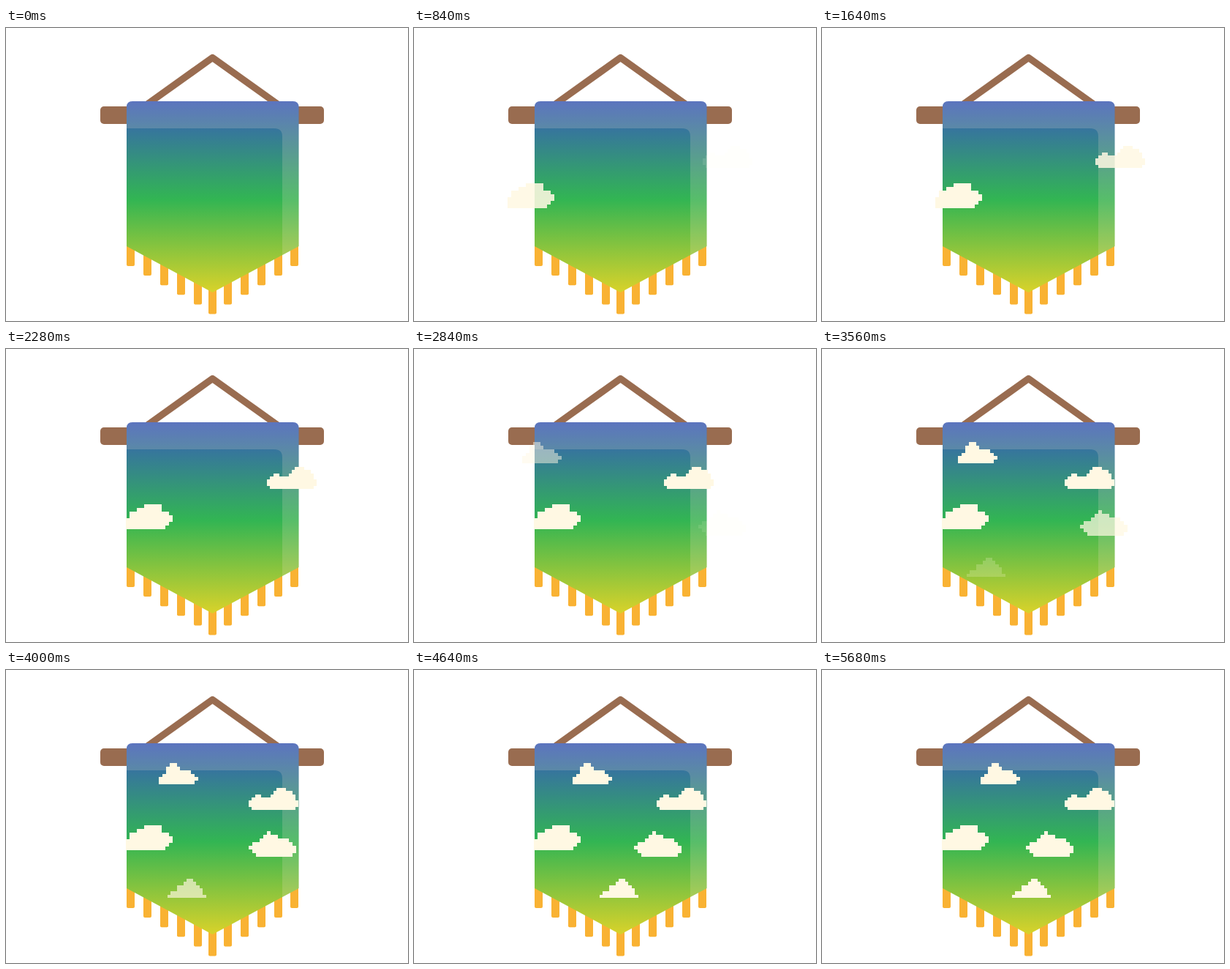
Animation, 550 px wide and 400 px high, one loop 5760 ms. Source, as an HTML page:

```html
<!DOCTYPE html>
<html lang="en">
<head>
<meta charset="utf-8">
<title>Pennant with clouds</title>
<style>
  html, body { margin: 0; width: 100%; height: 100%; overflow: hidden; background: #fff; }
  svg { display: block; width: 100vw; height: 100vh; }
</style>
</head>
<body>
<svg id="stage" viewBox="0 0 550 400">
  <defs>
    <linearGradient id="cloth" gradientUnits="userSpaceOnUse" x1="0" y1="100" x2="0" y2="360">
      <stop offset="0" stop-color="#385cba"/>
      <stop offset=".515" stop-color="#32b553"/>
      <stop offset="1" stop-color="#d8d22a"/>
    </linearGradient>
  </defs>
  <polyline points="192,105 282.5,40.5 373,105" fill="none" stroke="#996c50" stroke-width="9.5" stroke-linejoin="round"/>
  <rect x="129" y="107" width="306" height="24" rx="5" fill="#996c50"/>
  <g id="fringe" fill="#f9b233"></g>
  <path fill="url(#cloth)" d="M165 298V108Q165 100 173 100H392.500Q400.500 100 400.500 108V298L282.500 361Z"/>
  <path fill="#ffe0d0" fill-opacity=".18" d="M165 137V108Q165 100 173 100H392.500Q400.500 100 400.500 108V298L378 310V148Q378 137 367 137Z"/>
  <g id="clouds" fill="#fff8e3" shape-rendering="crispEdges"></g>
</svg>
<script>
const LOOP = 5760, STEP = 40;
const make = (name, attrs, parent) => {
  const el = document.createElementNS('http://www.w3.org/2000/svg', name);
  for (const key in attrs) el.setAttribute(key, attrs[key]);
  return parent.appendChild(el);
};

const fringe = document.getElementById('fringe');
[165, 188, 211, 234, 257, 277, 298, 321, 344, 367, 389].forEach((x, i) => {
  const bottom = 390.5 - 13.1 * Math.abs(i - 5);
  make('rect', { x, y: bottom - 40, width: 11, height: 40, rx: 2 }, fringe);
});

// Each row lists its filled runs as "from-to" in cells. Speed is in px per second.
const clouds = [
  { rows: '5-10 3-10 1-12 1-13 0-13 0-12 0-11', w: 64 / 13, h: 34 / 7,
    x: 164, y: 212, speed: 33.5, start: 0, end: 1920, fade: 960 },
  { rows: '9-12 8-14 2-4,7-15 1-15 0-16 0-16 1-15', w: 68 / 16, h: 30 / 7,
    x: 332, y: 161, speed: -26.7, start: 720, end: 3200, fade: 1080 },
  { rows: '3-5 2-6 2-9 1-10 0-11 0-10', w: 54 / 11, h: 29 / 6,
    x: 217, y: 127, speed: 52.5, start: 2360, end: 4152, fade: 960 },
  { rows: '5-6 4-8 3-11 1-12 0-13 1-13 2-12', w: 5, h: 5,
    x: 279, y: 220, speed: -49, start: 2720, end: 5080, fade: 1160 },
  { rows: '6-8 5-9 3-10 3-11 1-11 0-12', w: 52.5 / 12, h: 26 / 6,
    x: 260, y: 285, speed: 52.3, start: 3360, end: 4746, fade: 960 }
];

function cellPath({ rows, w, h }) {
  return rows.split(' ').map((row, r) => row.split(',').map(run => {
    const [from, to] = run.split('-').map(n => Math.round(n * w));
    return `M${from} ${Math.round(r * h)}H${to}V${Math.round((r + 1) * h)}H${from}Z`;
  }).join('')).join('');
}

const group = document.getElementById('clouds');
for (const c of clouds) c.el = make('path', { d: cellPath(c) }, group);

function draw(t) {
  for (const c of clouds) {
    const left = Math.min(c.end - c.start, Math.max(0, c.end - t));
    const x = c.x - c.speed * left / 1000;
    const alpha = Math.min(1, Math.max(0, (t - c.start) / c.fade));
    c.el.setAttribute('transform', `translate(${x.toFixed(2)} ${c.y})`);
    c.el.setAttribute('opacity', alpha.toFixed(3));
  }
}

const begin = performance.now();
function tick() {
  const t = (performance.now() - begin) % LOOP;
  draw(Math.floor(t / STEP) * STEP);
  requestAnimationFrame(tick);
}
tick();
</script>
</body>
</html>
```
